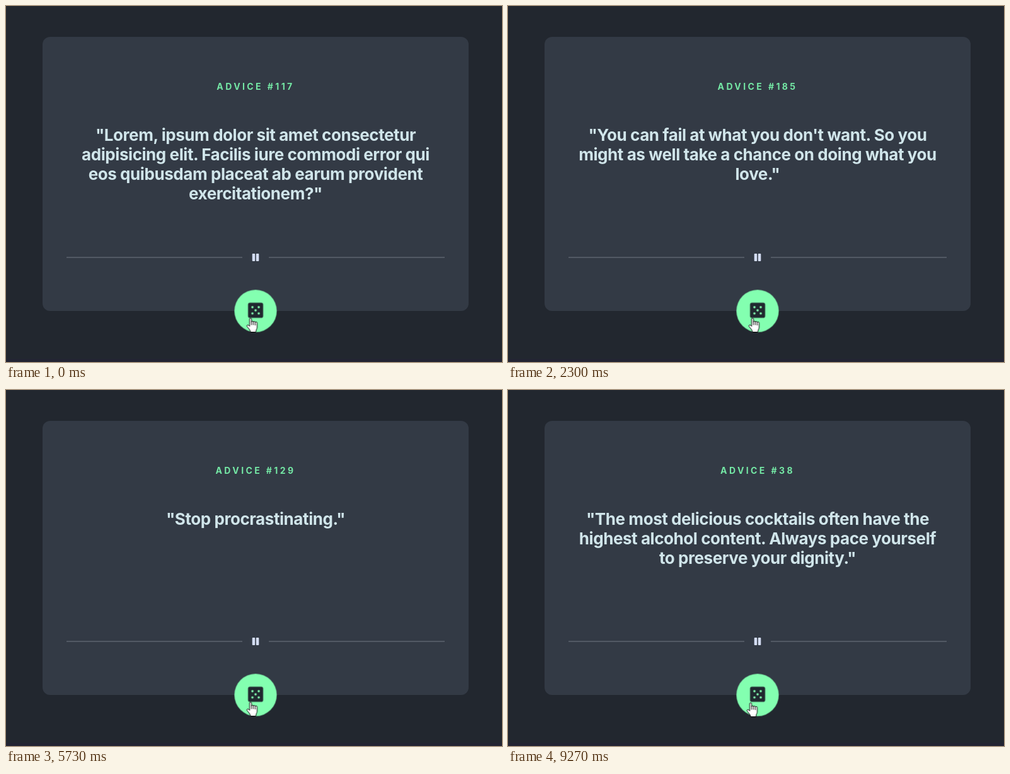
An HTML page for the animation above (9350 ms loop, 787x565 px).

```html
<!DOCTYPE html>
<html lang="en">
<head>
<meta charset="utf-8">
<title>Advice generator</title>
<style>
  html, body { margin: 0; width: 100%; height: 100%; overflow: hidden; background: #22272f; }
  .stage { position: relative; width: 787px; height: 565px; overflow: hidden; font-family: Inter, sans-serif; }
  .stage::after { content: ""; position: absolute; left: 0; right: 0; bottom: 0; height: 5px; background: #232433; }
  .card { position: absolute; left: 58px; top: 49px; width: 676px; height: 435px; border-radius: 12px; background: #333a45; }
  .strip { position: absolute; inset: 0; animation: quotes 9350ms step-end infinite; }
  .quote { position: relative; height: 565px; }
  h1, p { position: absolute; left: 58px; width: 676px; margin: 0; text-align: center; white-space: nowrap; }
  h1 { top: 119px; font-size: 14px; line-height: 18px; font-weight: 700; letter-spacing: 3.4px; color: #74e8a5; }
  p { top: 189px; font-size: 26px; line-height: 31px; font-weight: 700; letter-spacing: -0.43px; color: #d0e5ea; }
  svg { position: absolute; left: 0; top: 0; }
  .button { transform-origin: 396px 484px; transform: scale(1.05); animation: press 9350ms step-end infinite; }
  .cursor { transform: translate(381.5px, 495px); animation: drift 9350ms step-end infinite; }

  @keyframes quotes {
    0% { transform: none; }
    8.021% { transform: translateY(-565px); }
    24.5989% { transform: translateY(-1130px); }
    45.6684% { transform: translateY(-1695px); }
    62.2459% { transform: translateY(-2260px); }
    82.3529%, 100% { transform: translateY(-2825px); }
  }
  @keyframes press {
    0%, 5.2406%, 22.9946%, 43.9572%, 60.5347%, 80.6417%, 98.1818%, 100% { transform: scale(1.05); }
    3.6363%, 21.2834%, 42.2459%, 58.9304%, 78.9304%, 96.4705% { transform: scale(1); }
    4.4385%, 22.139%, 43.1016%, 59.786%, 79.893%, 97.326% { transform: scale(1.015); }
  }
  @keyframes drift {
    0% { transform: translate(381.5px, 495px); }
    68.4491% { transform: translate(380px, 495.5px); }
    69.1978%, 100% { transform: translate(378.5px, 496px); }
  }
</style>
</head>
<body>
<div class="stage">
  <div class="card"></div>
  <div class="strip">
    <div class="quote"><h1>ADVICE #117</h1><p>"Lorem, ipsum dolor sit amet consectetur<br>adipisicing elit. Facilis iure commodi error qui<br>eos quibusdam placeat ab earum provident<br>exercitationem?"</p></div>
    <div class="quote"><h1>ADVICE #138</h1><p>"Keep it simple."</p></div>
    <div class="quote"><h1>ADVICE #185</h1><p>"You can fail at what you don't want. So you<br>might as well take a chance on doing what you<br>love."</p></div>
    <div class="quote"><h1>ADVICE #129</h1><p>"Stop procrastinating."</p></div>
    <div class="quote"><h1>ADVICE #151</h1><p>"When faced with a choice, do both."</p></div>
    <div class="quote"><h1>ADVICE #38</h1><p>"The most delicious cocktails often have the<br>highest alcohol content. Always pace yourself<br>to preserve your dignity."</p></div>
  </div>
  <svg width="787" height="565">
    <path d="M96 399H375M417 399H696" stroke="#525964" stroke-width="2"/>
    <g fill="#d3dcf3">
      <rect x="390.7" y="393" width="4.5" height="12" rx="1"/>
      <rect x="396.8" y="393" width="4.5" height="12" rx="1"/>
    </g>
    <g class="button" fill="#83ffb0">
      <circle cx="396" cy="484" r="32"/>
      <rect x="384.57" y="471.62" width="22.86" height="22.86" rx="3" fill="#20282f"/>
      <circle cx="391.25" cy="478.3" r="1.7"/>
      <circle cx="400.75" cy="478.3" r="1.7"/>
      <circle cx="396" cy="483.05" r="1.7"/>
      <circle cx="391.25" cy="487.8" r="1.7"/>
      <circle cx="400.75" cy="487.8" r="1.7"/>
    </g>
    <g class="cursor" fill="#fff" stroke="#000" stroke-linejoin="round" stroke-linecap="round">
      <path d="M5 13V2a1.5 1.5 0 0 1 3 0V6.5a1.5 1.5 0 0 1 3 .3a1.5 1.5 0 0 1 3 .7a1.5 1.5 0 0 1 3 1.2V15C17 17.5 15 18.5 15 22.5H6.5C6.5 19.5 3 16.5 1 13.5C0 11.5 2 10.5 3.2 11.5Z"/>
      <path d="M8 6.5V11M11 7V11M14 8V11.5" fill="none"/>
    </g>
  </svg>
</div>
</body>
</html>
```
